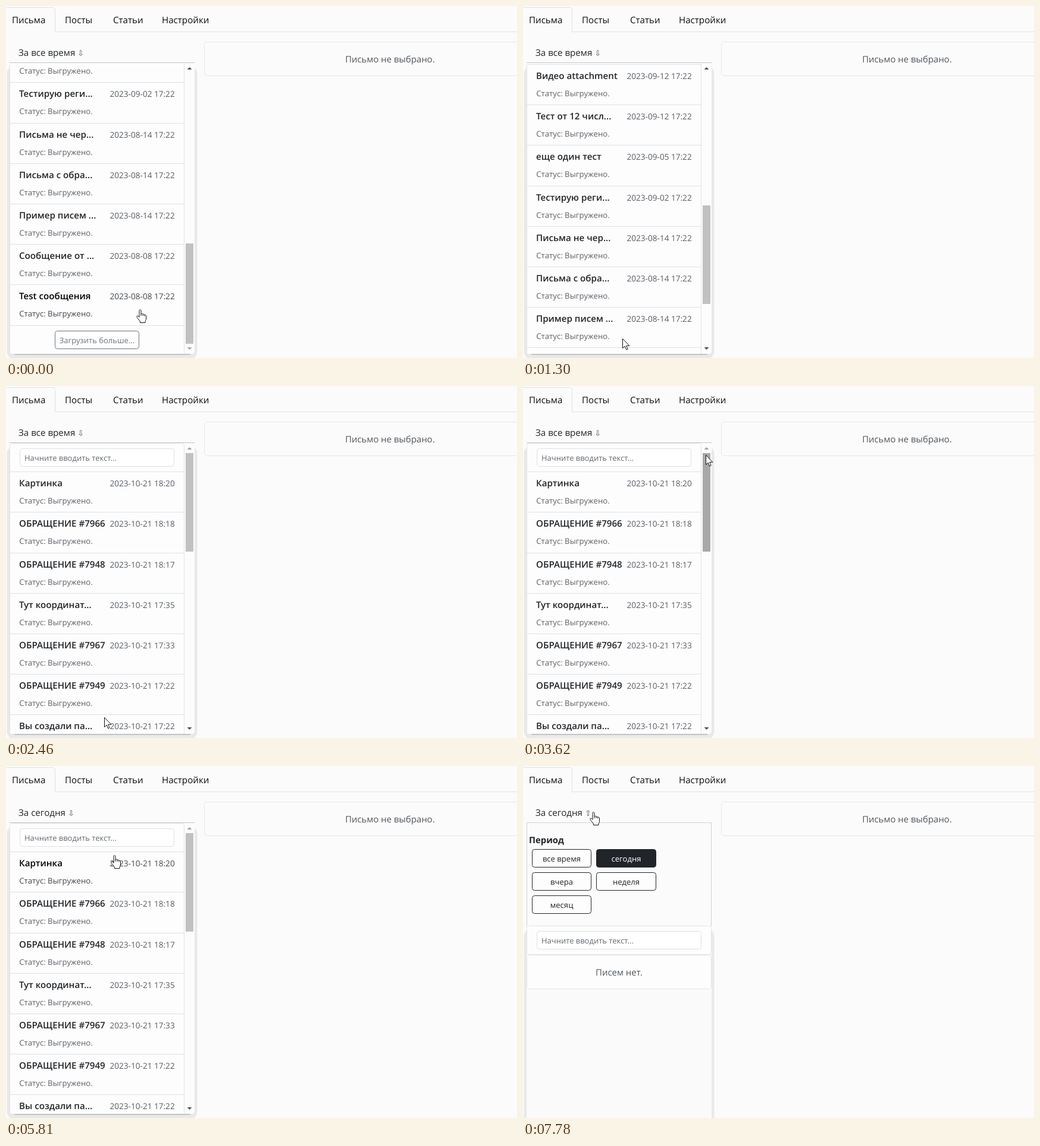
Write an HTML page that moves like this. It is 859 by 593 pixels and loops after 8000 ms.

```html
<!DOCTYPE html>
<html lang="ru">
<head>
<meta charset="utf-8">
<title>Письма</title>
<style>
html, body { margin: 0; width: 100%; height: 100%; overflow: hidden; background: #fbfbfb; }
svg { display: block; width: 859px; height: 593px; }
text {
  font: 15.15px "Open Sans", "Noto Sans", sans-serif;
  text-rendering: geometricPrecision;
  fill: #212529;
  white-space: pre;
}
.tab { fill: #0c0c0c; }
.note { font-size: 14.95px; fill: #50565c; text-anchor: middle; }
.arrow { font: 13px "DejaVu Sans", sans-serif; fill: #555; }
.heading { font-size: 14.8px; font-weight: 700; }
.title { font-weight: 600; }
.date { font-size: 13.6px; fill: #555b62; }
.status { font-size: 13.2px; fill: #5b6167; }
.hint { font-size: 13px; fill: #62686e; }
.row line, #end { stroke: #dfe1e4; }
.row.hover .title { fill: #000; }
.row.hover .date, .row.hover .status { fill: #40464c; }
.card { fill: #fdfdfd; stroke: #e3e4e6; }
.plain { fill: none; stroke: #e6e7e9; }
.field { fill: #fff; stroke: #dcdfe3; }
.btn rect { fill: #fdfdfd; stroke: #212529; }
.btn text { font-size: 13.1px; text-anchor: middle; }
.btn.on rect { fill: #212529; }
.btn.on text { fill: #fff; }
#more rect { fill: #fdfdfd; stroke: #6c757d; }
#more text { font-size: 13px; fill: #6c757d; text-anchor: middle; }
#more.on rect { fill: #6c757d; }
#more.on text { fill: #fff; }
#cursors path { fill: #fff; stroke: #111; stroke-linejoin: round; }
</style>
</head>
<body>
<svg viewBox="0 0 859 593">
  <defs>
    <clipPath id="view"><rect x="6" y="96" width="311" height="490" rx="5"/></clipPath>
  </defs>

  <path d="M0 2.5H78.5a4 4 0 0 1 4 4V43.5H859" fill="none" stroke="#dee2e6"/>
  <text class="tab" x="10" y="29">Письма</text>
  <text class="tab" x="99" y="29">Посты</text>
  <text class="tab" x="180" y="29">Статьи</text>
  <text class="tab" x="262" y="29">Настройки</text>

  <rect class="plain" x="333.5" y="60.5" width="624" height="57" rx="5"/>
  <text class="note" x="645.5" y="95">Письмо не выбрано.</text>

  <text x="21" y="84"><tspan id="period"></tspan><tspan id="arrow" class="arrow" dx="4"></tspan></text>

  <g id="panel">
    <path d="M6.5 270V95.5H316.5V270" fill="none" stroke="#cfd1d3"/>
    <text class="heading" x="10" y="130">Период</text>
  </g>

  <g id="box">
    <rect x="1.5" y="101" width="320" height="494" rx="13" fill="#e9e9e9"/>
    <rect x="12" y="580" width="300" height="8" rx="5" fill="#c3c4c5"/>
    <rect x="6" y="96" width="311" height="490" rx="5" fill="#fafafa"/>
    <g clip-path="url(#view)">
      <g id="list">
        <g id="top">
          <rect class="card" x="6.5" y="96.5" width="293" height="1400" rx="4"/>
          <rect class="field" x="23.5" y="105.5" width="259" height="30" rx="4"/>
          <text class="hint" x="31" y="126">Начните вводить текст...</text>
        </g>
        <g id="rows"></g>
        <line id="end" x1="7" x2="299" y1=".5" y2=".5"/>
        <g id="more">
          <rect id="frame" x="82.5" y=".5" width="141" rx="4"/>
          <text x="153" y="21">Загрузить больше...</text>
          <g id="dots" fill="#212529">
            <circle cx="141" cy="34" r="3.2"/><circle cx="153" cy="34" r="3.2"/><circle cx="165" cy="34" r="3.2"/>
          </g>
        </g>
      </g>
      <g id="bar">
        <rect x="300" y="96" width="17" height="490" fill="#fcfcfc"/>
        <path id="up" d="M304.5 107L308.5 103L312.5 107Z"/>
        <path id="down" d="M304.5 575L308.5 579L312.5 575Z"/>
        <rect id="thumb" x="302" width="13"/>
      </g>
      <g id="empty">
        <rect class="card" x="6.5" y="96.5" width="310" height="48" rx="4"/>
        <rect class="field" x="23.5" y="105.5" width="276" height="30" rx="4"/>
        <text class="hint" x="31" y="126">Начните вводить текст...</text>
        <g id="none">
          <rect class="card" x="6.5" y="145.5" width="310" height="57" rx="5"/>
          <text class="note" x="161.5" y="180">Писем нет.</text>
        </g>
      </g>
    </g>
  </g>
  <path id="rule" d="M6 95.5H317" stroke="#c2c4c6"/>

  <g id="cursors">
    <path id="pointer" d="M.5 .5V16.6L4.2 13.1L6.7 18.9L9.1 17.9L6.7 12.3H11.8Z"/>
    <path id="hand" d="M5 2.3C5 .1 8 .1 8 2.3V8C8.5 6.8 11 7 11 8.6C11.6 7.6 13.8 8 13.8 9.6C14.6 8.8 16.5 9.3 16.5 10.9V16C16.5 18 15 19.5 15 21V22.5H6.5V21C6.5 19 1 14.5 .8 12.5C.8 10.9 2.8 10.5 3.8 11.9L5 13.3ZM8 8V11M11 8.6V11M13.8 9.6V11.5"/>
    <path id="beam" style="fill:none" d="M0 .5H2.5L3.5 1.5L4.5 .5H7M3.5 1.5V14.5M0 15.5H2.5L3.5 14.5L4.5 15.5H7"/>
  </g>
</svg>
<script>
const LOOP = 8000, PITCH = 68.2, FIRST = 144.6, TRACK = 457, VIEW = 490;
const $ = id => document.getElementById(id);

function add(parent, tag, attrs, label) {
  const el = document.createElementNS("http://www.w3.org/2000/svg", tag);
  for (const key in attrs) el.setAttribute(key, attrs[key]);
  if (label) el.textContent = label;
  return parent.appendChild(el);
}

const show = (id, on) => { $(id).style.display = on ? "" : "none"; };
const paint = (id, color) => $(id).setAttribute("fill", color);
const move = (el, x, y) => el.setAttribute("transform", `translate(${x} ${y})`);
const at = (steps, t) => steps.filter(step => step[0] <= t).pop();

const mails = [
  ["Картинка", "10-21 18:20"],
  ["ОБРАЩЕНИЕ #7966", "10-21 18:18"],
  ["ОБРАЩЕНИЕ #7948", "10-21 18:17"],
  ["Тут координат...", "10-21 17:35"],
  ["ОБРАЩЕНИЕ #7967", "10-21 17:33"],
  ["ОБРАЩЕНИЕ #7949", "10-21 17:22"],
  ["Вы создали па...", "10-21 17:22"],
  ["Тест от 12 числ...", "09-12 17:22"],
  ["Тест от 12 числ...", "09-12 17:22"],
  ["Видео attachment", "09-12 17:22"],
  ["Тест от 12 числ...", "09-12 17:22"],
  ["еще один тест", "09-05 17:22"],
  ["Тестирую реги...", "09-02 17:22"],
  ["Письма не чер...", "08-14 17:22"],
  ["Письма с обра...", "08-14 17:22"],
  ["Пример писем ...", "08-14 17:22"],
  ["Сообщение от ...", "08-08 17:22"],
  ["Test сообщения", "08-08 17:22"]
];
const rows = mails.map(([title, date]) => {
  const row = add($("rows"), "g", { class: "row" });
  add(row, "line", { x1: 7, x2: 299, y1: .5, y2: .5 });
  add(row, "text", { class: "title", x: 22, y: 25 }, title);
  add(row, "text", { class: "date", x: 174.5, y: 25 }, "2023-" + date);
  add(row, "text", { class: "status", x: 22.3, y: 54 }, "Статус: Выгружено.");
  return row;
});

const periods = ["все время", "сегодня", "вчера", "неделя", "месяц"].map((label, i) => {
  const col = i % 2, x = 15 + 108 * col, y = 140 + 39 * (i >> 1);
  const btn = add($("panel"), "g", { class: "btn" });
  add(btn, "rect", { x: x + .5, y: y + .5, width: 99 + col, height: 30, rx: 4 });
  add(btn, "text", { x: x + 50 + col / 2, y: y + 21 }, label);
  return btn;
});

// time, scroll offset
const scrolls = [
  [0, 834.1], [1060, 800], [1180, 700], [1300, 660], [1820, 640], [1940, 561.1],
  [2070, 420], [2190, 290], [2340, 90], [2460, 0]
];

// time, left, top, shape
const path = [
  [0, 219, 511, "hand"], [130, 216, 528, "hand"], [250, 206, 547, "hand"], [400, 204, 547, "hand"],
  [760, 206, 550, "pointer"], [910, 207, 554, "pointer"], [1060, 190, 558, "pointer"],
  [1180, 172, 561, "pointer"], [1300, 167, 560, "pointer"], [1450, 166, 559, "pointer"],
  [1570, 165, 558, "pointer"],
  [2710, 176, 532, "hand"], [2840, 212, 440, "hand"], [2960, 243, 352, "hand"], [3110, 262, 283, "hand"],
  [3260, 318, 240, "pointer"], [3380, 356, 190, "pointer"], [3500, 340, 138, "pointer"],
  [3620, 307, 116, "pointer"], [3760, 246, 102, "pointer"], [3880, 165, 86, "pointer"],
  [4000, 118, 79, "hand"], [4700, 110, 92, "pointer"], [4820, 101, 111, "pointer"],
  [4970, 92, 163, "hand"], [5120, 95, 182, "hand"], [5240, 99, 201, "hand"],
  [5390, 177, 153, "hand"], [5540, 176, 150, "hand"],
  [6480, 125, 158, "beam"], [6630, 152, 206, "pointer"], [6750, 166, 230, "pointer"],
  [6900, 160, 196, "pointer"], [7020, 140, 166, "beam"], [7140, 159, 140, "pointer"],
  [7290, 136, 104, "pointer"], [7410, 112, 77, "hand"]
];

function drawList(scroll, hoverY) {
  // Rows snap to whole pixels
  const rowTop = i => Math.floor(FIRST + PITCH * i - scroll + 1e-6);
  move($("top"), 0, -scroll);
  rows.forEach((row, i) => {
    move(row, 0, rowTop(i));
    row.classList.toggle("hover", hoverY >= rowTop(i) && hoverY < rowTop(i + 1));
  });
  const end = rowTop(rows.length);
  move($("end"), 0, end);
  move($("more"), 0, end + 9);
}

function drawBar(scroll, loaded, x, y) {
  const content = loaded ? 1350 : 1324;
  const top = Math.floor(113 + TRACK * scroll / content);
  const size = Math.round(TRACK * VIEW / content);
  const hover = x > 300 && x < 316 && y > top && y < top + size;
  $("thumb").setAttribute("y", top);
  $("thumb").setAttribute("height", size);
  paint("thumb", hover ? "#a8a8a8" : "#c1c1c1");
  paint("up", scroll > 0 ? "#505050" : "#a3a3a3");
  paint("down", loaded ? "#505050" : "#a3a3a3");
}

function render(t) {
  const open = t >= 4150 && t < 5690 || t >= 7780;
  const today = t >= 5690, empty = t >= 6060;
  const loaded = t >= 400, loading = loaded && t < 760;
  const scroll = at(scrolls, t)[1], [, x, y, shape] = at(path, t);

  $("period").textContent = today ? "За сегодня" : "За все время";
  $("arrow").textContent = open ? "⇧" : "⇩";
  show("panel", open);
  show("rule", !open);
  periods[0].classList.toggle("on", !today);
  periods[1].classList.toggle("on", today);

  move($("box"), 0, open ? 173 : 0);
  show("list", !empty);
  show("bar", !empty);
  show("empty", empty);
  show("none", t >= 6180);

  drawList(scroll, !open && shape === "hand" ? y : -1);
  drawBar(scroll, loaded, x, open ? -1 : y);
  $("more").classList.toggle("on", t >= 250 && t < 760);
  $("frame").setAttribute("height", loading ? 50 : 30);
  show("dots", loading);

  for (const id of ["pointer", "hand", "beam"]) show(id, id === shape);
  move($(shape), x, y);
}

const start = performance.now();
function tick() {
  render((performance.now() - start) % LOOP);
  requestAnimationFrame(tick);
}
render(0);
requestAnimationFrame(tick);
</script>
</body>
</html>
```
